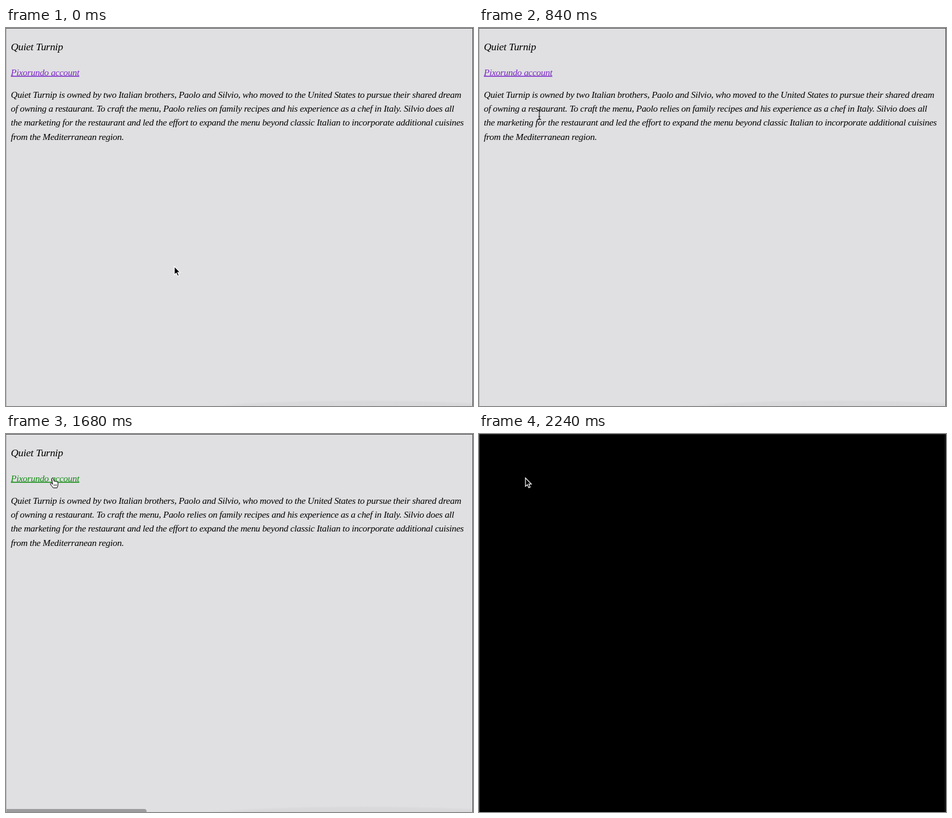
Write an HTML page that moves like this. It is 774 by 628 pixels and loops after 2590 ms.

```html
<!DOCTYPE html>
<html lang="en">
<head>
<meta charset="utf-8">
<title>Link states</title>
<style>
  html, body { margin: 0; width: 100%; height: 100%; overflow: hidden; }
  svg { display: block; }
  text { font: italic 15.5px "Liberation Serif", "Times New Roman", serif; letter-spacing: -.29px; }
  #title { font-size: 17.5px; letter-spacing: -.3px; }
  #link { text-decoration: underline; }
</style>
</head>
<body>
<svg width="774" height="628">
  <defs>
    <radialGradient id="glow">
      <stop offset=".8" stop-color="#d9d9db"/>
      <stop offset="1" stop-color="#d9d9db" stop-opacity="0"/>
    </radialGradient>
  </defs>
  <g id="page">
    <rect width="774" height="628" fill="#e0e0e2"/>
    <ellipse cx="590" cy="632" rx="270" ry="14" fill="url(#glow)"/>
    <text id="title" x="8" y="37">Quiet Turnip</text>
    <rect id="mark" x="7" y="61" width="113" height="23"/>
    <text id="link" x="8" y="78.5">Pixorundo account</text>
    <text x="8" y="115.5">Quiet Turnip is owned by two Italian brothers, Paolo and Silvio, who moved to the United States to pursue their shared dream</text>
    <text x="8" y="138.8">of owning a restaurant. To craft the menu, Paolo relies on family recipes and his experience as a chef in Italy. Silvio does all</text>
    <text x="8" y="162.2">the marketing for the restaurant and led the effort to expand the menu beyond classic Italian to incorporate additional cuisines</text>
    <text x="8" y="185.5">from the Mediterranean region.</text>
    <path id="status" d="M0 623H229Q233 623 233 627V628H0Z" fill="#9c9c9e"/>
    <path d="M.5 0V628" stroke="#b4b4b6"/>
    <path d="M0 .5H774M773.5 0V628" stroke="#505052"/>
  </g>
  <g id="blank" fill="none">
    <rect width="774" height="628" fill="#000"/>
    <path d="M0 .5H774M772.5 0V628" stroke="#262626"/>
    <path d="M.5 0V628" stroke="#444"/>
  </g>
  <g id="cursor">
    <path id="arrow" d="M0 0V14L3.2 11.2 5.5 16.2 7.8 15.2 5.6 10.2H9.8Z" stroke="#fff" stroke-width="1.2"/>
    <g id="beam" fill="none">
      <path d="M-3-8Q0-8 0-6Q0-8 3-8M0-6V6M-3 8Q0 8 0 6Q0 8 3 8M-1.5 3H1.5" stroke="#111" stroke-width="1.1"/>
    </g>
    <g id="hand" stroke="#000">
      <path d="M-1.4 1Q0-1 1.4 1L2.6 5.6Q4 4.5 5 5.9Q6.6 5.1 7.4 6.7Q9 6.3 9.2 8.2L9 12Q8.8 14 7.6 16.5H1.2Q-1 13.5-3 11Q-4.4 9-2.6 8.8Q-1 9 .4 10.5Z" fill="#fff"/>
      <path d="M2.6 10.5V13.5M4.6 10.5V13.5M6.6 10.5V13.5" stroke-width=".7"/>
    </g>
  </g>
</svg>
<script>
const LOOP = 2590, STEP = 70;
const HOVER = 1260, PRESS = 2100, LEAVE = 2240;
// time, x, y of the cursor's hot spot
const path = [
  [0, 279, 396], [70, 274, 390], [280, 167, 254], [420, 92, 155], [560, 63, 100],
  [630, 52, 112], [770, 82, 151], [840, 100, 144], [980, 111, 116],
  [1120, 87, 91], [1190, 81, 84], [1260, 79, 79], [1470, 77, 73], [LOOP, 77, 73]
];
const el = id => document.getElementById(id);
const show = (id, on) => el(id).style.display = on ? "" : "none";

function position(t) {
  const i = path.findIndex(p => p[0] > t);
  const [t0, x0, y0] = path[i - 1], [t1, x1, y1] = path[i];
  const k = (t - t0) / (t1 - t0);
  return [x0 + (x1 - x0) * k, y0 + (y1 - y0) * k];
}

function draw(now) {
  const t = Math.floor(now % LOOP / STEP) * STEP;
  const [x, y] = position(t);
  const hover = t >= HOVER && t < LEAVE, press = t >= PRESS;
  const beam = t < HOVER && y > 99 && y < 194;

  show("page", t < LEAVE);
  show("blank", t >= LEAVE);
  show("mark", press);
  show("beam", beam);
  show("hand", hover);
  show("arrow", !beam && !hover);
  el("link").style.fill = press ? "#fff" : hover ? "#148a14" : "#7d2bc8";
  el("status").style.opacity = Math.max(0, Math.min(1, (t - 1330) / 210));
  el("cursor").setAttribute("transform", `translate(${x} ${y})`);
}

const start = performance.now();
function tick() {
  draw(performance.now() - start);
  requestAnimationFrame(tick);
}
tick();
</script>
</body>
</html>
```
